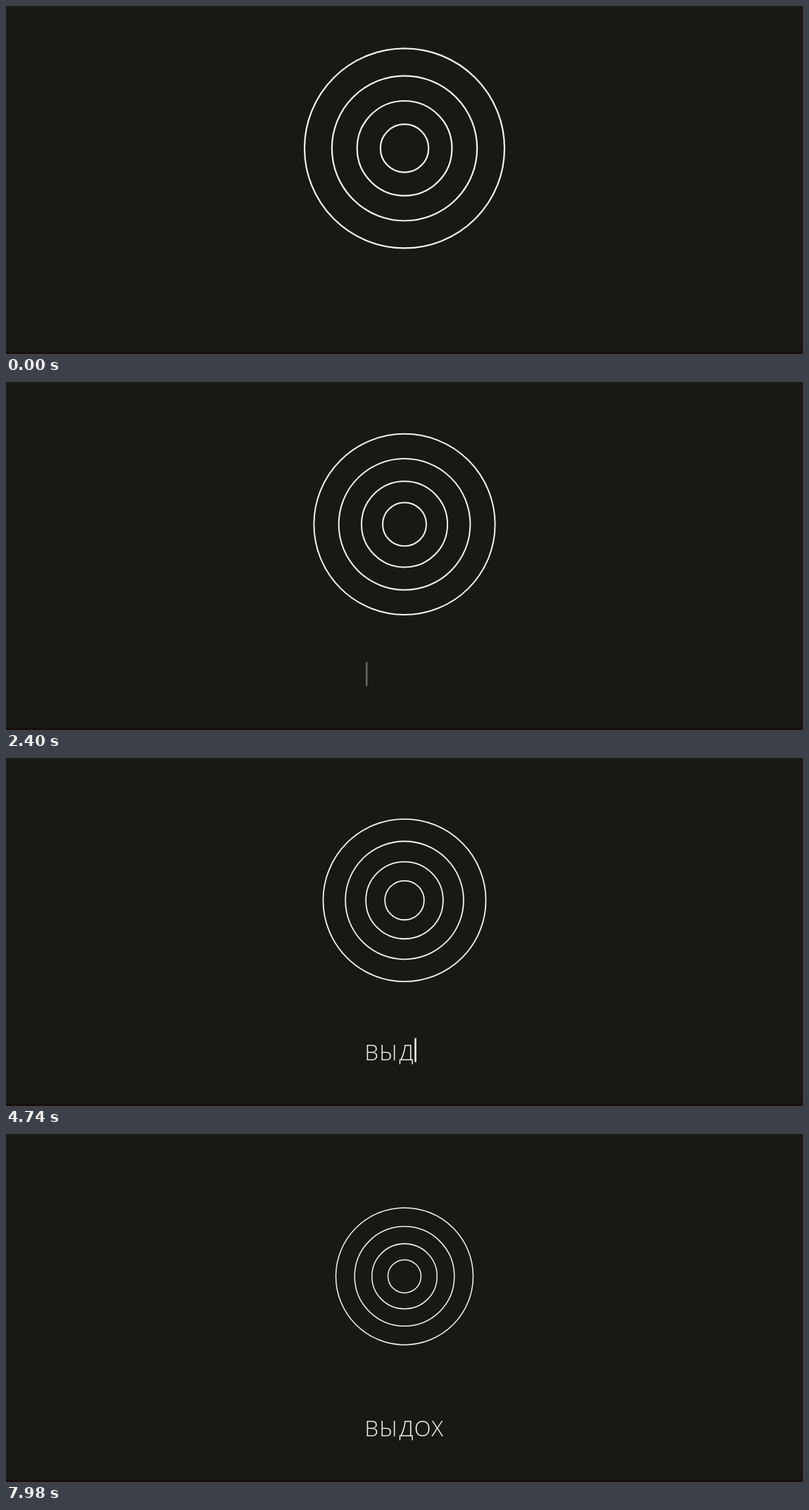
An HTML page for the animation above (8 s loop, 1132x495 px).

```html
<!DOCTYPE html>
<html lang="ru">
<head>
<meta charset="utf-8">
<title>Дыхание</title>
<style>
html, body { margin: 0; width: 100%; height: 100%; overflow: hidden; background: #181914; }
svg { display: block; width: 1132px; height: 495px; }
circle { fill: none; stroke: #f3f4ea; stroke-width: 2.2; }
text { font: 300 31px "Open Sans", "Noto Sans", sans-serif; fill: #f6f6f0; text-anchor: middle; }
</style>
</head>
<body>
<svg viewBox="0 0 1132 495">
  <defs>
    <linearGradient id="edge" x2="0" y2="1">
      <stop stop-color="#181914"/>
      <stop offset="1" stop-color="#160e0c"/>
    </linearGradient>
  </defs>
  <rect y="488" width="1132" height="7" fill="url(#edge)"/>
  <g id="rings">
    <circle r="34.2"/>
    <circle r="67.4"/>
    <circle r="103.1"/>
    <circle r="142"/>
  </g>
  <g id="word"></g>
  <rect id="caret" y="398.5" width="2.5" height="34" fill="#f6f6f0"/>
</svg>
<script>
const LOOP = 8000, SHRINK = 0.3134;
const BLINK = 1020, CARET_ON = 2190, CARET_OFF = 6270;

// letter, centre x, time typed, caret x afterwards
const letters = [
  ['В', 519.2, 2750, 530.2],
  ['Ы', 543, 3550, 555.4],
  ['Д', 568.5, 4350, 580.3],
  ['О', 591.5, 5150, 602.3],
  ['Х', 612.5, 5950, 622]
];

const $ = id => document.getElementById(id);
const rings = $('rings'), caret = $('caret');

const glyphs = letters.map(([char, x]) => {
  const el = document.createElementNS('http://www.w3.org/2000/svg', 'text');
  el.textContent = char;
  el.setAttribute('x', x);
  el.setAttribute('y', 429.6);
  return $('word').appendChild(el);
});

// The motion advances in a repeating 20, 100, 20 ms rhythm.
function stepTime(ms) {
  const phase = ms % 140;
  return ms - phase + (phase < 20 ? 0 : phase < 120 ? 20 : 120);
}

function draw(ms) {
  const t = stepTime(ms);
  const scale = 1 - SHRINK * t / 7980;
  rings.setAttribute('transform', `translate(566 202.4) scale(${scale})`);

  let caretX = 511;
  letters.forEach(([, , typed, after], i) => {
    const shown = t >= typed;
    glyphs[i].style.visibility = shown ? 'visible' : 'hidden';
    if (shown) caretX = after;
  });

  const active = t >= CARET_ON && t < CARET_OFF;
  const glow = 0.5 - 0.5 * Math.cos(2 * Math.PI * (t - CARET_ON) / BLINK);
  caret.setAttribute('x', caretX);
  caret.setAttribute('opacity', active ? glow : 0);
}

const start = performance.now();
function tick() {
  draw((performance.now() - start) % LOOP);
  requestAnimationFrame(tick);
}
tick();
</script>
</body>
</html>
```
